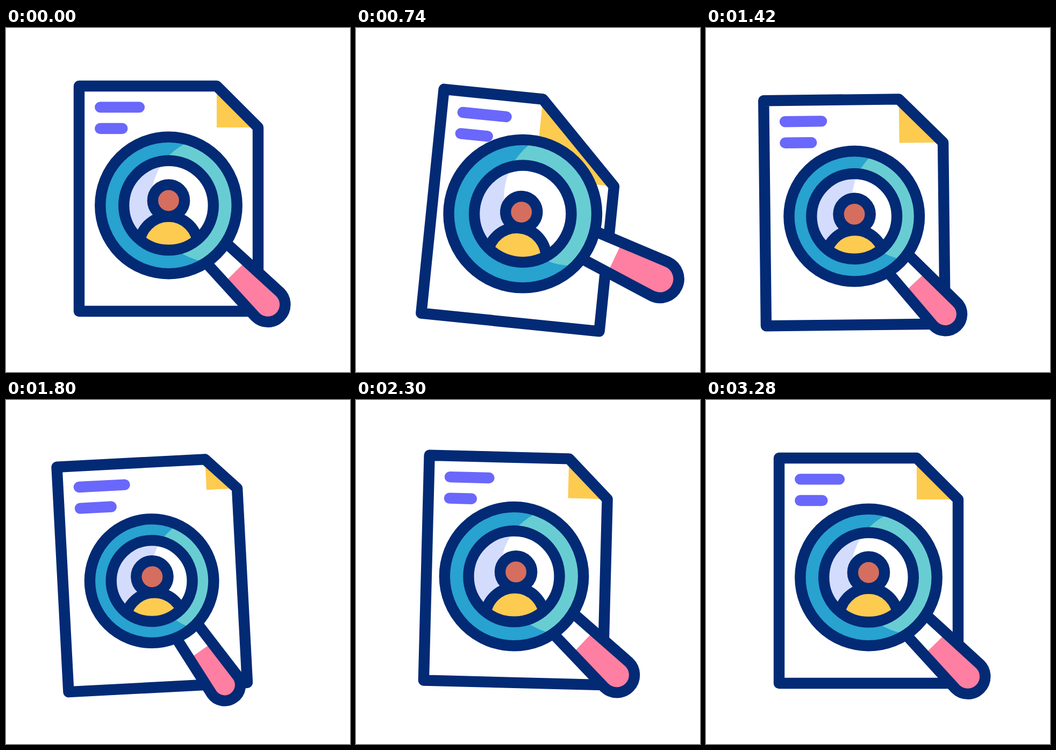
Write an HTML page without scripts that moves like this. It is 640 px wide and 640 px high and loops after 3600 ms.

```html
<!DOCTYPE html>
<html lang="en">
<head>
<meta charset="utf-8">
<title>Profile search</title>
<style>
@property --x { syntax: "<length>"; inherits: true; initial-value: 0px }
@property --y { syntax: "<length>"; inherits: true; initial-value: 0px }
@property --tilt { syntax: "<angle>"; inherits: true; initial-value: 0deg }
@property --fold { syntax: "<number>"; inherits: true; initial-value: 77 }
@property --row1 { syntax: "<length>"; inherits: true; initial-value: 93px }
@property --row2 { syntax: "<length>"; inherits: true; initial-value: 61.4px }
@property --lx { syntax: "<length>"; inherits: true; initial-value: 0px }
@property --ly { syntax: "<length>"; inherits: true; initial-value: 0px }
@property --swing { syntax: "<angle>"; inherits: true; initial-value: 45deg }
@property --zoom { syntax: "<number>"; inherits: true; initial-value: 1 }
@property --hx { syntax: "<length>"; inherits: true; initial-value: 387px }
@property --hy { syntax: "<length>"; inherits: true; initial-value: 319px }

html, body { margin: 0; width: 100%; height: 100%; overflow: hidden; background: #fff }
svg { display: block; width: 100%; height: 100% }

/* sine ease in and out, unless a keyframe sets its own */
svg, .page { animation: turn 3.6s cubic-bezier(.37, 0, .63, 1) infinite }
svg { animation-name: turn, page-x, page-y, lens-x, lens-y, row1, row2 }

.line { stroke: #032a75; stroke-width: 20.4px; stroke-linejoin: round }
.none { fill: none }
.doc {
  transform-origin: 302.5px 317.5px;
  transform: translate(var(--x), var(--y)) rotate(var(--tilt));
}
.fold { transform: translate(469px, 108px) scale(var(--fold)) }
.row1 { width: var(--row1) }
.row2 { width: var(--row2) }
.grip {
  transform: translate(calc(302.5px + var(--lx)), calc(330px + var(--ly))) rotate(var(--swing)) scale(var(--zoom));
}
.grip .line { stroke-width: calc(20.4px / var(--zoom)) }
.rim, .eye { cx: calc(302.5px + var(--lx)); cy: calc(330px + var(--ly)) }
.rim { r: calc(127.2px * var(--zoom)) }
.eye { r: calc(83.3px * var(--zoom)) }
.shine { cx: var(--hx); cy: var(--hy); r: calc(117px * var(--zoom)) }

@keyframes turn {
  0% {
    --tilt: 0deg; --swing: 45deg; --zoom: 1; --fold: 77; --hx: 387px; --hy: 319px;
    d: path("M469 185V527H136V108H392Z"); animation-timing-function: cubic-bezier(.5, 0, .75, .43);
  }
  12.78% {
    --tilt: 2.7deg; --swing: 36deg; --zoom: 1.033; --fold: 106; --hx: 395px; --hy: 318px;
    d: path("M469 214V527H136V108H363Z"); animation-timing-function: cubic-bezier(.35, .36, .6, 1);
  }
  20.28% {
    --tilt: 5.8deg; --swing: 25.4deg; --zoom: 1.083; --fold: 148; --hx: 402px; --hy: 315.5px;
    d: path("M469 256V527H136V108H321Z");
  }
  49.72% {
    --tilt: -3deg; --swing: 55deg; --zoom: .906; --fold: 57; --hx: 376px; --hy: 322px;
    d: path("M469 165V527H136V108H412Z");
  }
  70.56% {
    --tilt: 2.8deg; --swing: 40.5deg; --zoom: 1.048; --fold: 78; --hx: 391px; --hy: 316px;
    d: path("M469 186V527H136V108H391Z"); animation-timing-function: cubic-bezier(.35, 0, .55, 1);
  }
  90%, 100% {
    --tilt: 0deg; --swing: 45deg; --zoom: 1; --fold: 77; --hx: 387px; --hy: 319px;
    d: path("M469 185V527H136V108H392Z");
  }
}
@keyframes page-x {
  0% { --x: 0px; animation-timing-function: cubic-bezier(.5, 0, .6, 1) }
  15.56% { --x: 8px }
  47.22% { --x: -32px }
  68.5% { --x: -1.5px; animation-timing-function: ease-out }
  79.17%, 100% { --x: 0px }
}
@keyframes page-y {
  0% { --y: 0px; animation-timing-function: cubic-bezier(.5, 0, .75, .43) }
  12.78% { --y: 8px; animation-timing-function: cubic-bezier(.33, .48, .6, 1) }
  31.25% { --y: 30px; animation-timing-function: cubic-bezier(.45, 0, .7, .95) }
  59.72% { --y: -4.5px }
  64.44% { --y: -1px; animation-timing-function: ease-out }
  79.17%, 100% { --y: 0px }
}
@keyframes lens-x {
  0% { --lx: 0px; animation-timing-function: cubic-bezier(.5, 0, .6, 1) }
  14.44% { --lx: 11.5px; animation-timing-function: cubic-bezier(.45, 0, .7, .565) }
  28.89% { --lx: -8px; animation-timing-function: cubic-bezier(.33, .5, .6, 1) }
  47.78% { --lx: -32px }
  70.83% { --lx: -2.5px }
  90%, 100% { --lx: 0px }
}
@keyframes lens-y {
  0% { --ly: 0px; animation-timing-function: cubic-bezier(.5, 0, .75, .43) }
  12.78% { --ly: 4px; animation-timing-function: cubic-bezier(.33, .4, .6, 1) }
  31.25% { --ly: 24px; animation-timing-function: cubic-bezier(.45, 0, .7, .95) }
  59.72% { --ly: -3px }
  66% { --ly: -1.6px; animation-timing-function: ease-out }
  79.17%, 100% { --ly: 0px }
}
@keyframes row1 {
  0%, 63.9%, 100% { --row1: 93px }
  13.9% { --row1: 123px }
  29.4% { --row1: 68.5px }
  48.6% { --row1: 105.5px }
}
@keyframes row2 {
  0%, 63.9%, 100% { --row2: 61.4px }
  16.7% { --row2: 73px }
  30% { --row2: 60.8px }
  49.5% { --row2: 78.4px }
}
</style>
</head>
<body>
<svg viewBox="0 0 640 640">
  <defs>
    <clipPath id="in-rim"><circle class="rim"/></clipPath>
    <clipPath id="in-eye"><circle class="eye"/></clipPath>
  </defs>

  <g class="doc">
    <path class="fold" fill="#fdcb50" d="M-1 0V1H0Z"/>
    <path class="page line none" d="M469 185V527H136V108H392Z"/>
    <g fill="#6a67fb">
      <rect class="row1" x="165.1" y="137.2" height="20.4" rx="10.2"/>
      <rect class="row2" x="165.1" y="176.8" height="20.4" rx="10.2"/>
    </g>
  </g>

  <g class="grip">
    <path fill="#fff" d="M120-26L261-32.3A32.3 32.3 0 0 1 261 32.3L120 26Z"/>
    <path fill="#fe7fa1" d="M175-28.4L261-32.3A32.3 32.3 0 0 1 261 32.3L175 28.4Z"/>
    <path class="line none" d="M120-26L261-32.3A32.3 32.3 0 0 1 261 32.3L120 26Z"/>
  </g>

  <circle class="rim" fill="#28a2cf"/>
  <g clip-path="url(#in-rim)"><circle class="shine" fill="#68cdd2"/></g>
  <circle class="rim line none"/>

  <circle class="eye" fill="#d3dcfc"/>
  <g clip-path="url(#in-eye)">
    <circle class="shine" fill="#fff"/>
    <g class="doc">
      <circle class="line" cx="302.5" cy="405" r="54.4" fill="#fdcb50"/>
      <circle class="line" cx="302.5" cy="321" r="29.6" fill="#d56e5e"/>
    </g>
  </g>
  <circle class="eye line none"/>
</svg>
</body>
</html>
```
